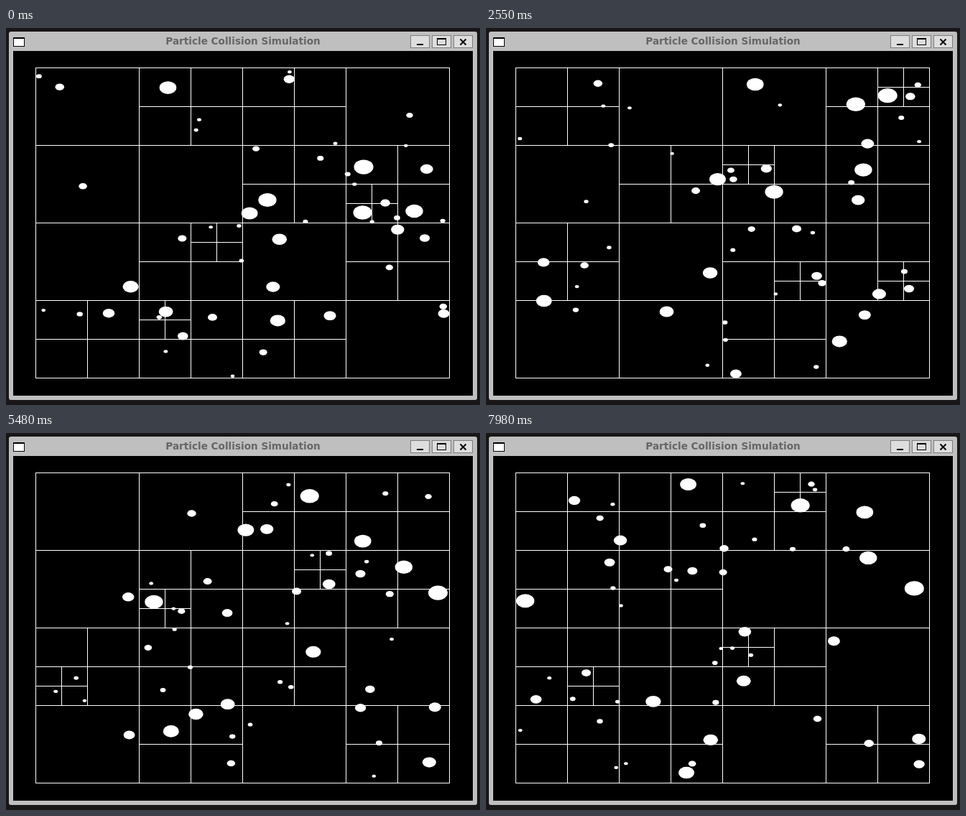
An HTML page with a canvas that plays this animation: 660 by 525 pixels, repeating every 8000 ms.

```html
<!DOCTYPE html>
<html lang="en">
<head>
<meta charset="utf-8">
<title>Particle Collision Simulation</title>
<style>
  html, body { margin: 0; width: 100%; height: 100%; overflow: hidden; background: #181617; }
  canvas { display: block; }
</style>
</head>
<body>
<canvas id="stage" width="660" height="525"></canvas>
<script>
const ctx = document.getElementById('stage').getContext('2d');
const LOOP = 8000, STEPS = 254, SUBSTEPS = 4, COUNT = 50;
const box = { x: 41, y: 55, w: 576, h: 432 };
const SQUASH = 0.75; // discs are round in a space that is shown 4:3
const space = { w: box.w * SQUASH, h: box.h };

// The largest discs start at set places with set speeds, in pixels per second.
const largest = [
  { x: 497.5, y: 193, vx: 25, vy: -62 },
  { x: 496, y: 256.5, vx: 8, vy: -77 },
  { x: 363.5, y: 239, vx: 21, vy: 13 },
  { x: 568, y: 254.5, vx: -8, vy: -40 }
];

let seed = 11;
const random = () => (seed = (seed * 16807) % 2147483647) / 2147483647;
const between = (low, high) => low + (high - low) * random();

// Radii fall off from a few large discs to many small ones.
const radiusOf = rank => SQUASH * (2.75 + 10.75 * (1 - rank / (COUNT - 1)) ** 2);

const overlaps = (a, b) => Math.hypot(a.x - b.x, a.y - b.y) < a.r + b.r;

function placeLargest({ x, y, vx, vy }, r) {
  return { r, x: (x - box.x) * SQUASH, y: y - box.y, vx: vx * SQUASH, vy };
}

function placeFreely(others, r) {
  const angle = between(0, 2 * Math.PI), speed = between(20, 110);
  const p = { r, vx: speed * Math.cos(angle), vy: speed * Math.sin(angle) };
  do {
    p.x = between(r, space.w - r);
    p.y = between(r, space.h - r);
  } while (others.some(other => overlaps(p, other)));
  return p;
}

function createParticles() {
  const list = [];
  for (let rank = 0; rank < COUNT; rank++) {
    const r = radiusOf(rank);
    list.push(largest[rank] ? placeLargest(largest[rank], r) : placeFreely(list, r));
  }
  return list;
}

function collide(a, b) {
  if (!overlaps(a, b)) return;
  const dx = b.x - a.x, dy = b.y - a.y;
  const approach = (b.vx - a.vx) * dx + (b.vy - a.vy) * dy;
  if (approach >= 0) return;
  const massA = a.r ** 2, massB = b.r ** 2;
  const impulse = 2 * approach / ((massA + massB) * (dx * dx + dy * dy));
  a.vx += impulse * massB * dx;
  a.vy += impulse * massB * dy;
  b.vx -= impulse * massA * dx;
  b.vy -= impulse * massA * dy;
}

function bounce(p) {
  if (p.x < p.r) p.vx = Math.abs(p.vx);
  if (p.x > space.w - p.r) p.vx = -Math.abs(p.vx);
  if (p.y < p.r) p.vy = Math.abs(p.vy);
  if (p.y > space.h - p.r) p.vy = -Math.abs(p.vy);
}

function advance(particles, dt) {
  for (const p of particles) {
    p.x += p.vx * dt;
    p.y += p.vy * dt;
    bounce(p);
  }
  particles.forEach((a, i) => {
    for (let j = i + 1; j < COUNT; j++) collide(a, particles[j]);
  });
}

function simulate() {
  const particles = createParticles(), history = [];
  for (let step = 0; step < STEPS; step++) {
    history.push(particles.map(p => ({ x: box.x + p.x / SQUASH, y: box.y + p.y, r: p.r })));
    for (let i = 0; i < SUBSTEPS; i++) advance(particles, LOOP / 1000 / STEPS / SUBSTEPS);
  }
  return history;
}

function fill(color, x, y, w, h) {
  ctx.fillStyle = color;
  ctx.fillRect(x, y, w, h);
}

function outline(color, x, y, w, h) {
  ctx.strokeStyle = color;
  ctx.lineWidth = 1;
  ctx.strokeRect(x + 0.5, y + 0.5, w, h);
}

function drawWindow() {
  fill('#181617', 0, 0, 660, 525);
  ctx.fillStyle = '#bfbfbf';
  ctx.beginPath();
  ctx.roundRect(4, 5, 652, 513, 3);
  ctx.fill();
  fill('#000', 10, 32, 640, 480);

  fill('#000', 10, 13, 16, 13);
  fill('#fff', 11, 15, 14, 10);

  ctx.font = 'bold 13.6px "DejaVu Sans", sans-serif';
  ctx.textAlign = 'center';
  ctx.fillStyle = '#666';
  ctx.fillText('Particle Collision Simulation', 330, 23);

  for (const x of [563, 593, 623]) {
    fill('#dedede', x, 10, 27, 18);
    outline('#7c7c7c', x, 10, 26, 17);
  }
  fill('#000', 572, 22, 9, 2);
  outline('#000', 600, 14, 12, 9);
  fill('#000', 600, 14, 13, 2);
  ctx.strokeStyle = '#000';
  ctx.lineWidth = 2;
  ctx.beginPath();
  ctx.moveTo(632.5, 15.5);
  ctx.lineTo(640.5, 23.5);
  ctx.moveTo(640.5, 15.5);
  ctx.lineTo(632.5, 23.5);
  ctx.stroke();
}

// Each cell holds at most two centres before it splits in four.
function drawTree(points, x, y, w, h) {
  outline('#fff', x, y, w, h);
  if (points.length < 3 || w <= 9) return;
  const halfW = w / 2, halfH = h / 2;
  for (const right of [false, true]) {
    for (const low of [false, true]) {
      const inside = points.filter(p => (p.x >= x + halfW) === right && (p.y >= y + halfH) === low);
      drawTree(inside, x + right * halfW, y + low * halfH, halfW, halfH);
    }
  }
}

function drawParticle(p) {
  ctx.beginPath();
  ctx.ellipse(p.x + 0.5, p.y + 0.5, p.r / SQUASH, p.r, 0, 0, 2 * Math.PI);
  ctx.fill();
}

const history = simulate();

function render(now) {
  const particles = history[Math.floor(now % LOOP / LOOP * STEPS)];
  drawWindow();
  drawTree(particles, box.x, box.y, box.w, box.h);
  ctx.fillStyle = '#fff';
  particles.forEach(drawParticle);
}

function tick() {
  render(performance.now());
  requestAnimationFrame(tick);
}
tick();
</script>
</body>
</html>
```
